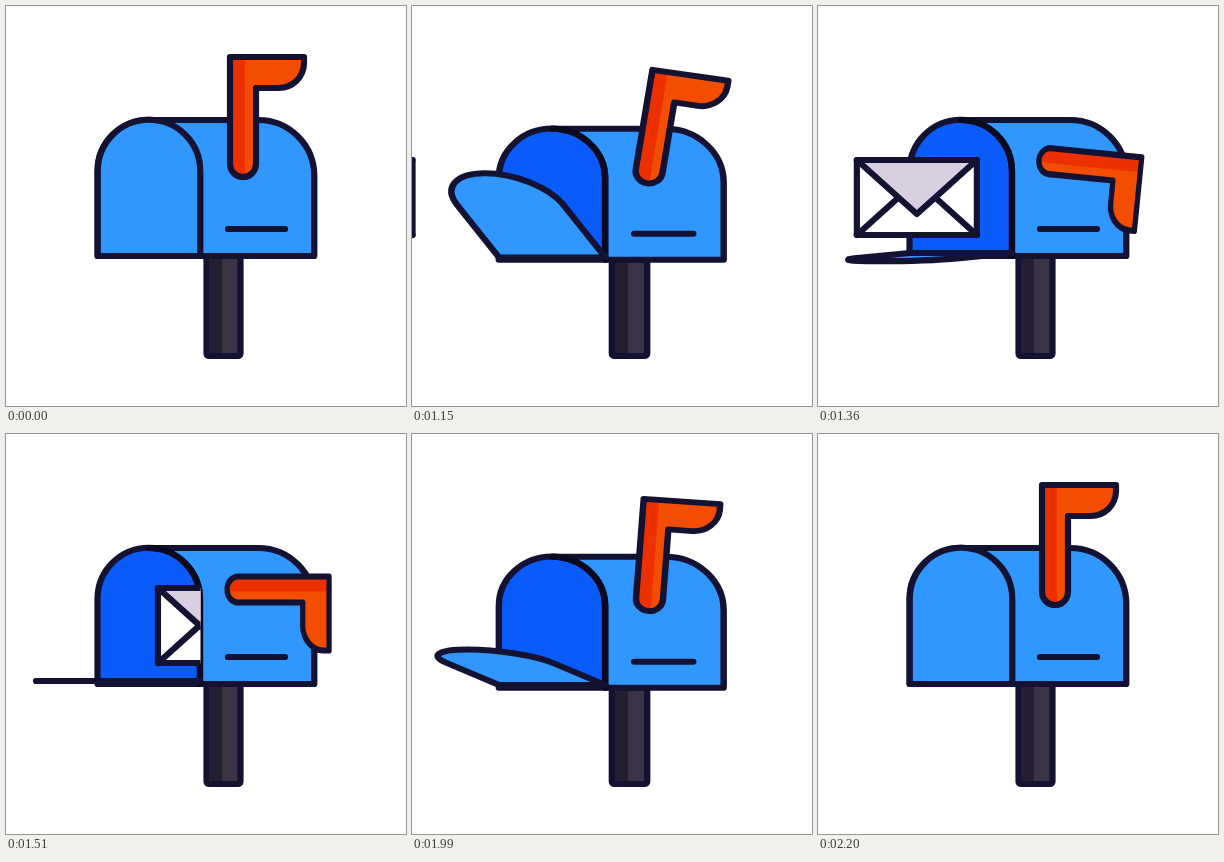
Write an HTML page that moves like this. It is 400x400 px and loops after 2230 ms.

```html
<!DOCTYPE html>
<html lang="en">
<head>
<meta charset="utf-8">
<title>Mailbox</title>
<style>
  html, body { margin: 0; width: 100%; height: 100%; overflow: hidden; background: #fff; }
  svg { display: block; width: 100vw; height: 100vh; }
  .ink { stroke: #131233; stroke-width: 6.2; stroke-linecap: round; stroke-linejoin: round; }
  .sky { fill: #3097ff; }
  .line { fill: none; }
  #shade { stroke: #090920; }
</style>
</head>
<body>
<svg viewBox="0 0 400 400">
  <defs>
    <clipPath id="mouth"><rect x="-100" y="100" width="294.5" height="200"/></clipPath>
    <path id="banner" d="M224 51H298V58A25 25 0 0 1 273 82H250V158A13 13 0 0 1 224 158Z"/>
  </defs>
  <g class="squash">
    <rect class="ink" fill="#3a3446" x="200.5" y="250" width="34" height="100" rx="2.5"/>
    <path fill="#231f30" d="M203.5 253H216V347H203.5Z"/>
    <path class="ink" fill="#0a5cfa" d="M91.5 250V165A51.25 51.25 0 0 1 194 165V250Z"/>
    <path class="ink sky" d="M143 114H252A56 56 0 0 1 308.3 170V250H194V165A51.25 51.25 0 0 0 143 114Z"/>
    <path class="ink" d="M222 223H279"/>
    <path class="ink line" id="shade" d="M143 114A51.25 51.25 0 0 1 194 165V250"/>
  </g>
  <g clip-path="url(#mouth)">
    <g class="ink" id="letter">
      <path fill="#fff" d="M0 154H-120V229H0Z"/>
      <path class="line" d="M0 229L-60 175L-120 229"/>
      <path fill="#d8d0e0" d="M0 154L-60 208L-120 154Z"/>
    </g>
  </g>
  <g class="squash">
    <path class="ink sky" id="lid"/>
    <g id="flag">
      <use href="#banner" fill="#f24d00"/>
      <path fill="#ec3000" d="M224 51H239V170.5A13 13 0 0 1 224 158Z"/>
      <use href="#banner" class="ink line"/>
    </g>
  </g>
</svg>
<script>
const LOOP = 2230, STEP = 30;
const $ = id => document.getElementById(id);
const squashed = document.querySelectorAll('.squash');

const phase = (t, from, to) => Math.min(1, Math.max(0, (t - from) / (to - from)));
const ease = (t, from, to) => (1 - Math.cos(Math.PI * phase(t, from, to))) / 2;
const bump = (t, from, to) => Math.sin(Math.PI * phase(t, from, to)) ** 2;
const place = (el, transform) => el.setAttribute('transform', transform);

// The lid is an arch turned by `turn` degrees about its bottom edge, seen at a slant.
function lidPath(turn) {
  const a = turn * Math.PI / 180, sin = Math.sin(a), cos = Math.cos(a);
  const r = 51.25, wall = 85, k = r * .5523;
  const p = (u, v) =>
    `${(143 + u - .62 * v * sin).toFixed(2)} ${(250 - 3 * sin - v * cos).toFixed(2)} `;
  return 'M' + p(-r, 0) + 'L' + p(-r, wall) +
    'C' + p(-r, wall + k) + p(-k, wall + r) + p(0, wall + r) +
    'C' + p(k, wall + r) + p(r, wall + k) + p(r, wall) +
    'L' + p(r, 0) + 'Z';
}

function draw(t) {
  // Wind up, swing down past level, settle; later swing back and settle again.
  const angle = -7 * ease(t, 1000, 1060) + 104 * ease(t, 1090, 1325) - 7 * ease(t, 1325, 1450)
    - 96 * ease(t, 1840, 2030) + 6 * ease(t, 2030, 2180);
  const length = 1 - .15 * (ease(t, 1090, 1330) - ease(t, 1840, 2060));
  const height = 1 - .04 * bump(t, 1000, 1360) - .037 * bump(t, 1840, 2140)
    + .004 * bump(t, 1510, 1660);
  const turn = 100 * ease(t, 1030, 1270) - 10 * ease(t, 1270, 1420) - 90 * phase(t, 1840, 2200) ** 2;

  for (const g of squashed)
    place(g, `translate(217 350) scale(${2 - height} ${height}) translate(-217 -350)`);
  place($('flag'), `translate(235.5 154) rotate(${angle}) scale(1 ${length}) translate(-235.5 -154)`);
  place($('letter'), `translate(${91 + (t - 1270) * .754})`);
  $('lid').setAttribute('d', lidPath(turn));
  $('shade').setAttribute('visibility', turn > 20 ? 'visible' : 'hidden');
}

function tick(now) {
  const t = now % LOOP;
  draw(Math.floor((t - 10) / STEP) * STEP + 10);
  requestAnimationFrame(tick);
}
draw(0);
requestAnimationFrame(tick);
</script>
</body>
</html>
```
